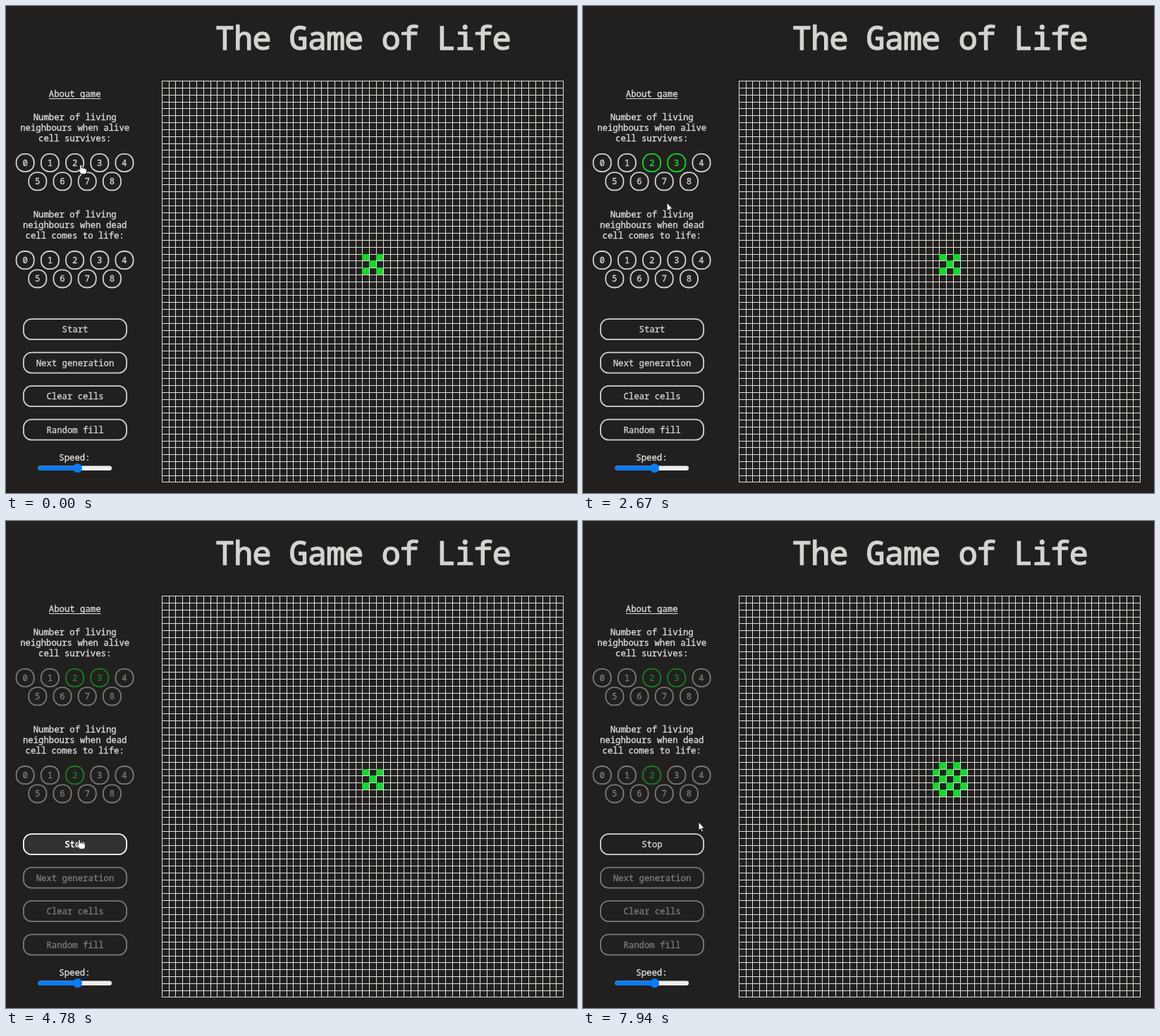
Recreate the animation shown at these times as an HTML page. Size 810 px wide and 691 px high, loop 8000 ms.

```html
<!DOCTYPE html>
<html lang="en">
<head>
<meta charset="utf-8">
<title>The Game of Life</title>
<style>
  html, body { margin: 0; width: 100%; height: 100%; overflow: hidden; background: #21201e; }
  svg { display: block; }
  text {
    font: 12.3px "Noto Sans Mono", "DejaVu Sans Mono", monospace;
    fill: currentColor; stroke: currentColor; stroke-width: .35; text-anchor: middle; color: #dcdcd8;
  }
  .title { font-size: 44.8px; letter-spacing: -.7px; stroke-width: 1.5; color: #d3d3d0; }
  .btn rect { fill: #21201e; stroke: #d3d3d0; stroke-width: 1.8; }
  .btn text { color: #d3d3d0; }
  .btn.hover rect { fill: #333230; stroke: #fff; }
  .btn.hover text { color: #fff; stroke-width: .6; }
  .btn.on rect { stroke: #14d92c; }
  .btn.on text { color: #14d92c; }
  .btn.off { opacity: .5; }
  .cursor { fill: #fff; stroke: #111; stroke-width: .9; stroke-linejoin: round; }
</style>
</head>
<body>
<svg id="stage" width="810" height="691" viewBox="0 0 810 691"></svg>
<script>
const LOOP = 8000, START = 4780, FIRST_TICK = 5560, TICK = 793;
const stage = document.getElementById('stage');

function add(parent, tag, attrs, label) {
  const el = document.createElementNS('http://www.w3.org/2000/svg', tag);
  for (const k in attrs) el.setAttribute(k, attrs[k]);
  if (label) el.textContent = label;
  parent.appendChild(el);
  return el;
}
const write = (x, y, label, more) => add(stage, 'text', { x, y, ...more }, label);

// Static text
write(506.5, 61.8, 'The Game of Life', { class: 'title' });
write(97.7, 129, 'About game');
add(stage, 'rect', { x: 61, y: 131, width: 73.5, height: 1, fill: '#dcdcd8' });
const paragraph = (y, lines) => lines.forEach((s, i) => write(97.7, y + i * 14.7, s));
paragraph(162.2, ['Number of living', 'neighbours when alive', 'cell survives:']);
paragraph(300.4, ['Number of living', 'neighbours when dead', 'cell comes to life:']);
write(97.5, 645, 'Speed:');

// Speed slider
const track = (width, fill) => add(stage, 'rect', { x: 45.5, y: 652.4, width, height: 6.6, rx: 3.3, fill });
track(104.5, '#efefec');
track(56, '#0a7cf5');
add(stage, 'circle', { cx: 101.5, cy: 655.7, r: 6.5, fill: '#0a7cf5' });

// Buttons
const buttons = [];
function button(x, y, w, h, label, pickAt = Infinity) {
  const el = add(stage, 'g', { class: 'btn' });
  add(el, 'rect', { x: x - w / 2 + .9, y: y - h / 2 + .9, width: w - 1.8, height: h - 1.8, rx: 11.5 });
  const text = add(el, 'text', { x, y: y + 4.5 }, label);
  const b = { el, text, x, y, w, h, pickAt };
  buttons.push(b);
  return b;
}
function digits(y, picks) {
  for (let n = 0; n < 9; n++) {
    const low = n > 4;
    const x = 97.6 + (low ? n - 6.5 : n - 2) * 35.2;
    button(x, low ? y + 26.3 : y, 27, 27, String(n), picks[n]);
  }
}
digits(222.5, { 2: 1000, 3: 1940 });
digits(360.6, { 2: 3390 });
const [toggle] = ['Start', 'Next generation', 'Clear cells', 'Random fill'].map((s, i) =>
  button(98, 458.7 + i * 47.5, 148, 30.8, s));

// Board
const COUNT = 58, PITCH = 9.815;
const colX = i => Math.round(220.86 + i * PITCH);
const rowY = i => Math.round(106.22 + i * PITCH);
let lines = '';
for (let i = 0; i <= COUNT; i++) {
  lines += `M${colX(i) + .5} ${rowY(0)}V${rowY(COUNT) + 1}M${colX(0)} ${rowY(i) + .5}H${colX(COUNT) + 1}`;
}
add(stage, 'path', { d: lines, stroke: '#e0e0dc', 'stroke-width': 1 });
const cells = add(stage, 'path', { fill: '#14d92c' });

// Survives with 2 or 3 neighbours, born with 2
function evolve(live) {
  const near = new Map();
  for (const id of live) {
    for (let dy = -1; dy < 2; dy++) for (let dx = -1; dx < 2; dx++) {
      const k = id + dy * COUNT + dx;
      if (k !== id) near.set(k, (near.get(k) || 0) + 1);
    }
  }
  return new Set([...near].filter(([k, n]) => n === 2 || (n === 3 && live.has(k))).map(e => e[0]));
}
function cellPath(live) {
  let d = '';
  for (const id of live) {
    const c = id % COUNT, r = Math.floor(id / COUNT);
    d += `M${colX(c)} ${rowY(r)}H${colX(c + 1)}V${rowY(r + 1)}H${colX(c)}Z`;
  }
  return d;
}
const MIDDLE = 26 * COUNT + 30;
const generations = [];
let live = new Set([0, COUNT + 1, COUNT - 1, -COUNT + 1, -COUNT - 1].map(d => MIDDLE + d));
for (let t = FIRST_TICK - TICK; t < LOOP; t += TICK) {
  generations.push(cellPath(live));
  live = evolve(live);
}

// Pointer glides: start, end and where each one stops
const glides = [
  { from: 1280, to: 1560, x: 134, y: 224 },
  { from: 2330, to: 3060, x: 97, y: 362 },
  { from: 3720, to: 4220, x: 104, y: 452 },
  { from: 6390, to: 6830, x: 164, y: 427 }
];
const ease = k => k * k * k * (10 + k * (6 * k - 15));

// The pointer is redrawn about every 92 ms while it moves
function pointer(t) {
  let x = 106, y = 225;
  for (const g of glides) {
    if (t < g.from) break;
    const span = g.to - g.from, gaps = Math.round(span / 92);
    const step = Math.floor((t - g.from) / span * gaps + .1) + 1;
    const k = ease(Math.min(1, step / (gaps + 1)));
    x += (g.x - x) * k;
    y += (g.y - y) * k;
  }
  return [Math.round(x), Math.round(y)];
}
const shapes = {
  hand: 'M-1.3 1Q0-.9 1.3 1V5L2.6 4.6 3.9 5.3 5.3 5 6.5 6 7.8 6 8.5 7.2V10.2L7.2 13.5H.2L-1 11.2-4 7.6Q-4 6-2.6 6.3L-1.3 7.6Z',
  arrow: 'M0 0V12L2.7 9.6 4.6 14 6.5 13.2 4.6 9H8.3Z'
};
const cursor = add(stage, 'path', { class: 'cursor' });

function render(t) {
  const [x, y] = pointer(t);
  const running = t >= START;
  let over = false;
  for (const b of buttons) {
    const off = running && b !== toggle;
    const hit = !off && Math.abs(x - b.x) < b.w / 2 && Math.abs(y - b.y) < b.h / 2;
    over = over || hit;
    b.el.classList.toggle('off', off);
    b.el.classList.toggle('hover', hit && t >= 60);
    b.el.classList.toggle('on', t >= b.pickAt);
  }
  toggle.text.textContent = running ? 'Stop' : 'Start';
  const age = Math.max(0, Math.floor((t - FIRST_TICK) / TICK) + 1);
  cells.setAttribute('d', generations[age]);
  cursor.setAttribute('d', over ? shapes.hand : shapes.arrow);
  cursor.setAttribute('transform', `translate(${x} ${y})`);
}

const begin = performance.now();
function loop() {
  render((performance.now() - begin) % LOOP);
  requestAnimationFrame(loop);
}
render(0);
requestAnimationFrame(loop);
</script>
</body>
</html>
```
